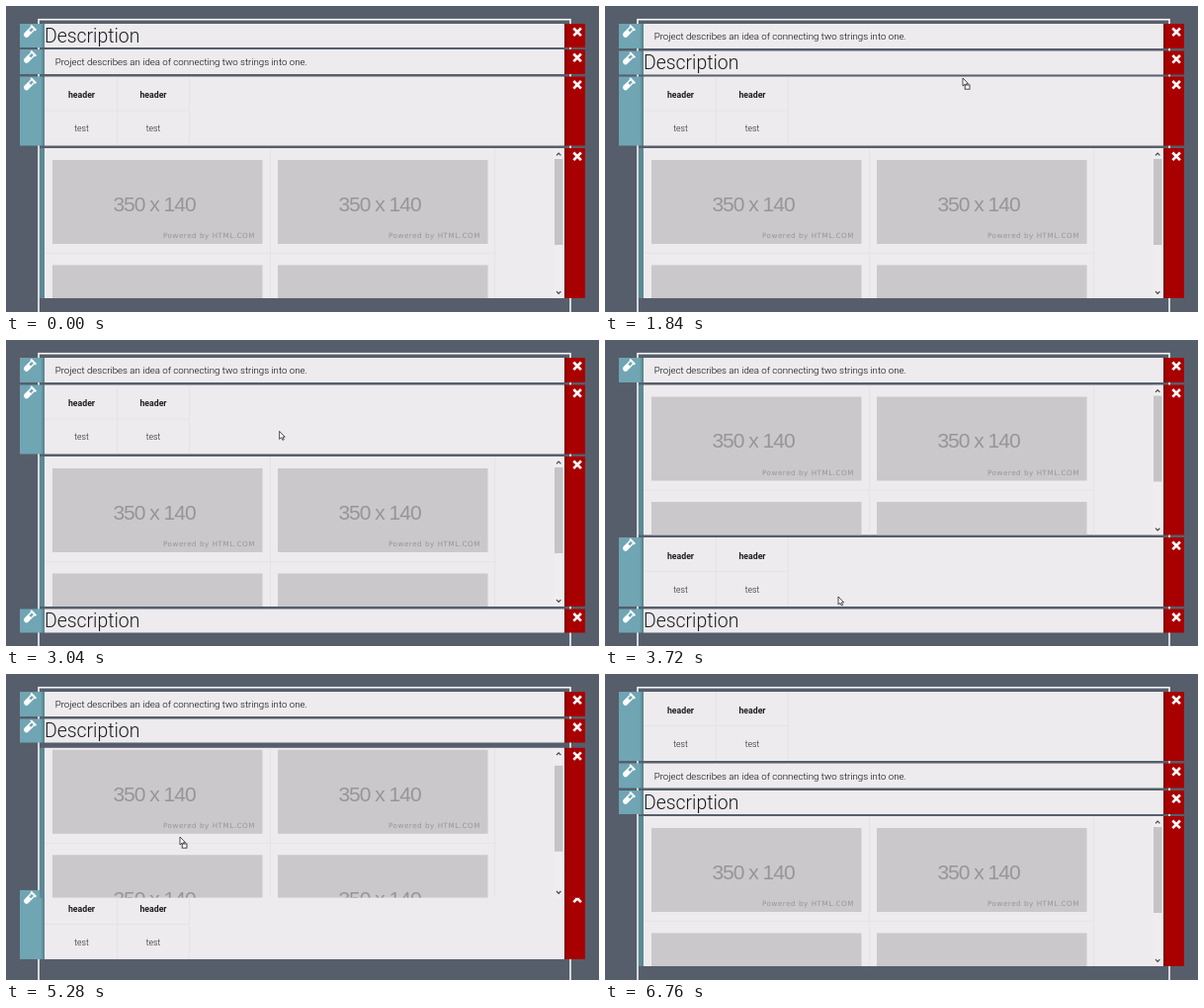
Write an HTML page that moves like this. It is 600 px wide and 310 px high and loops after 6.8 s.

```html
<!DOCTYPE html>
<html lang="en">
<head>
<meta charset="utf-8">
<title>Sortable sections</title>
<style>
  html, body { margin: 0; width: 100%; height: 100%; overflow: hidden; background: #565e6b; }
  #stage { position: absolute; left: 0; top: 0; width: 600px; height: 310px; overflow: hidden; }
  svg { position: absolute; left: 0; top: 0; display: block; overflow: hidden; }
  .row { position: absolute; left: 0; top: 0; width: 600px; }
  .handle, .remove, .body { position: absolute; top: 0; height: 100%; }
  .handle { left: 14px; width: 25px; background: linear-gradient(to left, #557f89, #70a5b4 4px); }
  .bare .handle { left: 34px; width: 5px; background: #5c8a94; }
  .remove { left: 564px; width: 22px; background: linear-gradient(to right, #5c0808, #a80000 4px); }
  .body { left: 39px; width: 525.5px; overflow: hidden; background: #edebee; }
  text { fill: #1d1d20; font-family: Roboto, sans-serif; }
  .title { font-size: 19.4px; font-weight: 300; }
  .para { font-size: 9.7px; font-weight: 300; fill: #000; }
  .cell { font-size: 8.73px; font-weight: 300; text-anchor: middle; }
  .head { font-weight: 700; }
  .rule { stroke: #e5e3e6; fill: none; }
  .size { font: 21px "Liberation Sans", Arial, sans-serif; letter-spacing: -1px; text-anchor: middle; fill: #969598; }
  .credit { font: 7.2px "DejaVu Sans", sans-serif; letter-spacing: .52px; fill: #969598; }
  #cursor { z-index: 9; overflow: visible; }
</style>
</head>
<body>
<div id="stage">
  <svg width="600" height="310"><rect x="33" y="13.7" width="538" height="320" fill="none" stroke="#f6f7f8" stroke-width="1.6"/></svg>
  <svg id="cursor" width="14" height="16">
    <path d="M0 0V8L2 6.4L3.3 9L4.6 8.4L3.4 5.8H5.6Z" fill="#fff" stroke="#222" stroke-width=".8"/>
    <rect id="badge" x="2.2" y="7" width="4.8" height="4.2" fill="#fff" stroke="#333" stroke-width=".9"/>
  </svg>
</div>
<script>
const LOOP = 6800, STEP = 40, SLIDE = 160, TOP = 18, GAP = 2.5;
const byId = id => document.getElementById(id);
const stage = byId('stage'), cursor = byId('cursor'), badge = byId('badge');

const line = d => `<path class="rule" d="${d}"/>`;
const cell = (x, y, s, c = '') => `<text class="cell ${c}" x="${x}" y="${y}">${s}</text>`;
const card = (x, y) => `<rect x="${x}" y="${y}" width="212.5" height="85" fill="#cac8cb"/>
  <text class="size" x="${x + 103}" y="${y + 51.8}">350 x 140</text>
  <text class="credit" x="${x + 112}" y="${y + 79}">Powered by HTML.COM</text>`;

const gallery = `<g id="pane">${[12, 118.5].map(y => card(8, y) + card(236, y)).join('')}
  ${line('M228.5 0V230M455.5 0V230M0 106.5H455')}</g>
  <rect x="515" width="11" height="152" fill="#efedf0"/>
  <rect id="thumb" x="516" y="11" width="8.5" height="87" fill="#c5c3c6"/>
  <path d="M518 7.3L520.2 5L522.4 7.3M518 145.2L520.2 147.5L522.4 145.2" fill="none" stroke="#444" stroke-width="1.2"/>`;

const table = [37.5, 110].map(x => cell(x, 21.6, 'header', 'head') + cell(x, 55.7, 'test')).join('')
  + line('M73.5 0V70M146.5 0V70M0 34.5H146');

const tube = `<svg width="25" height="24"><g transform="translate(9.6 8.2) rotate(45)">
  <path d="M-2-5V4a2 2 0 0 0 4 0V-5" fill="none" stroke="#fff" stroke-width="1.4"/>
  <path d="M-2-1H2V4a2 2 0 0 1-4 0Z" fill="#fff"/>
  <path d="M-3.7-5.8H3.7" stroke="#fff" stroke-width="2"/></g></svg>`;
const cross = `<svg width="22" height="24"><path d="M10.3 4.5L17.9 12.1M17.9 4.5L10.3 12.1" stroke="#fff" stroke-width="2.6"/></svg>`;

const rows = {
  A: { h: 23.5, art: '<text class="title" y="18.8">Description</text>' },
  B: { h: 25, art: '<text class="para" x="10.7" y="16.2">Project describes an idea of connecting two strings into one.</text>' },
  C: { h: 70, art: table },
  D: { h: 152, art: gallery, bare: true }
};
for (const r of Object.values(rows)) {
  r.el = document.createElement('div');
  r.el.className = r.bare ? 'row bare' : 'row';
  r.el.style.height = r.h + 'px';
  r.el.innerHTML = `<div class="handle">${r.bare ? '' : tube}</div><div class="remove">${cross}</div>
    <div class="body"><svg width="526" height="${r.h}">${r.art}</svg></div>`;
  stage.insertBefore(r.el, cursor);
}
const pane = byId('pane'), thumb = byId('thumb');

// Each drag moves one row a place up or down at every swap
const drags = [
  { key: 'A', dir: 1, press: 1300, drop: 2960, swaps: [1480, 1990, 2832] },
  { key: 'C', dir: 1, press: 3180, drop: 3640, swaps: [3330] },
  { key: 'A', dir: -1, press: 3880, drop: 4600, swaps: [3980, 4320] },
  { key: 'C', dir: -1, press: 5040, drop: 5780, swaps: [5270, 5440, 5628] }
];
// Pointer turning points: time, x, y
const path = [
  [640, 470, -14], [1300, 388, 30], [1840, 362, 73], [2840, 289, 133], [3180, 268, 64], [3720, 236, 260],
  [3880, 228, 284], [4600, 203, 58], [5040, 187, 252], [5280, 176, 165], [5640, 165, 30], [6300, 604, 140]
];

const orders = [{ at: -SLIDE, keys: 'ABCD' }];
for (const { key, dir, swaps } of drags) {
  for (const at of swaps) {
    const keys = [...orders.at(-1).keys], i = keys.indexOf(key);
    [keys[i], keys[i + dir]] = [keys[i + dir], key];
    orders.push({ at, keys: keys.join('') });
  }
}

const mix = (a, b, p) => a + (b - a) * p;

// CSS "ease" curve, solved by bisection
function ease(x) {
  if (x >= 1) return 1;
  let lo = 0, hi = 1, s = 0;
  for (let i = 0; i < 24; i++) {
    s = (lo + hi) / 2;
    if (.75 * s * (1 - s) + s ** 3 < x) lo = s; else hi = s;
  }
  return .3 * s * (1 - s) ** 2 + 3 * s * s * (1 - s) + s ** 3;
}

function layout(keys) {
  const tops = {};
  let y = TOP;
  for (const k of keys) { tops[k] = y; y += rows[k].h + GAP; }
  return tops;
}

function placeRows(t) {
  const i = orders.findLastIndex(o => o.at <= t);
  const { at, keys } = orders[i];
  const to = layout(keys), from = layout(orders[Math.max(0, i - 1)].keys);
  const p = ease((t - at) / SLIDE);
  [...keys].forEach((k, z) => {
    rows[k].el.style.zIndex = z + 1;
    rows[k].el.style.transform = `translateY(${mix(from[k], to[k], p)}px)`;
  });
}

function placeCursor(t) {
  const i = path.findIndex(p => p[0] > t);
  cursor.style.display = i > 0 ? 'block' : 'none';
  if (i < 1) return;
  const a = path[i - 1], b = path[i], p = (t - a[0]) / (b[0] - a[0]);
  cursor.style.transform = `translate(${mix(a[1], b[1], p)}px, ${mix(a[2], b[2], p)}px)`;
  badge.style.display = drags.some(d => t >= d.press && t < d.drop) ? 'inline' : 'none';
}

// The gallery scrolls a notch while the last drag crosses it
function scrollPane(t) {
  const s = t >= 5180 && t < 5400 ? 10 : 0;
  pane.setAttribute('transform', `translate(0 ${-s})`);
  thumb.setAttribute('y', 11 + s * .7);
}

const begin = performance.now();
function tick() {
  const t = Math.floor((performance.now() - begin) % LOOP / STEP) * STEP;
  placeRows(t);
  placeCursor(t);
  scrollPane(t);
  requestAnimationFrame(tick);
}
tick();
</script>
</body>
</html>
```
